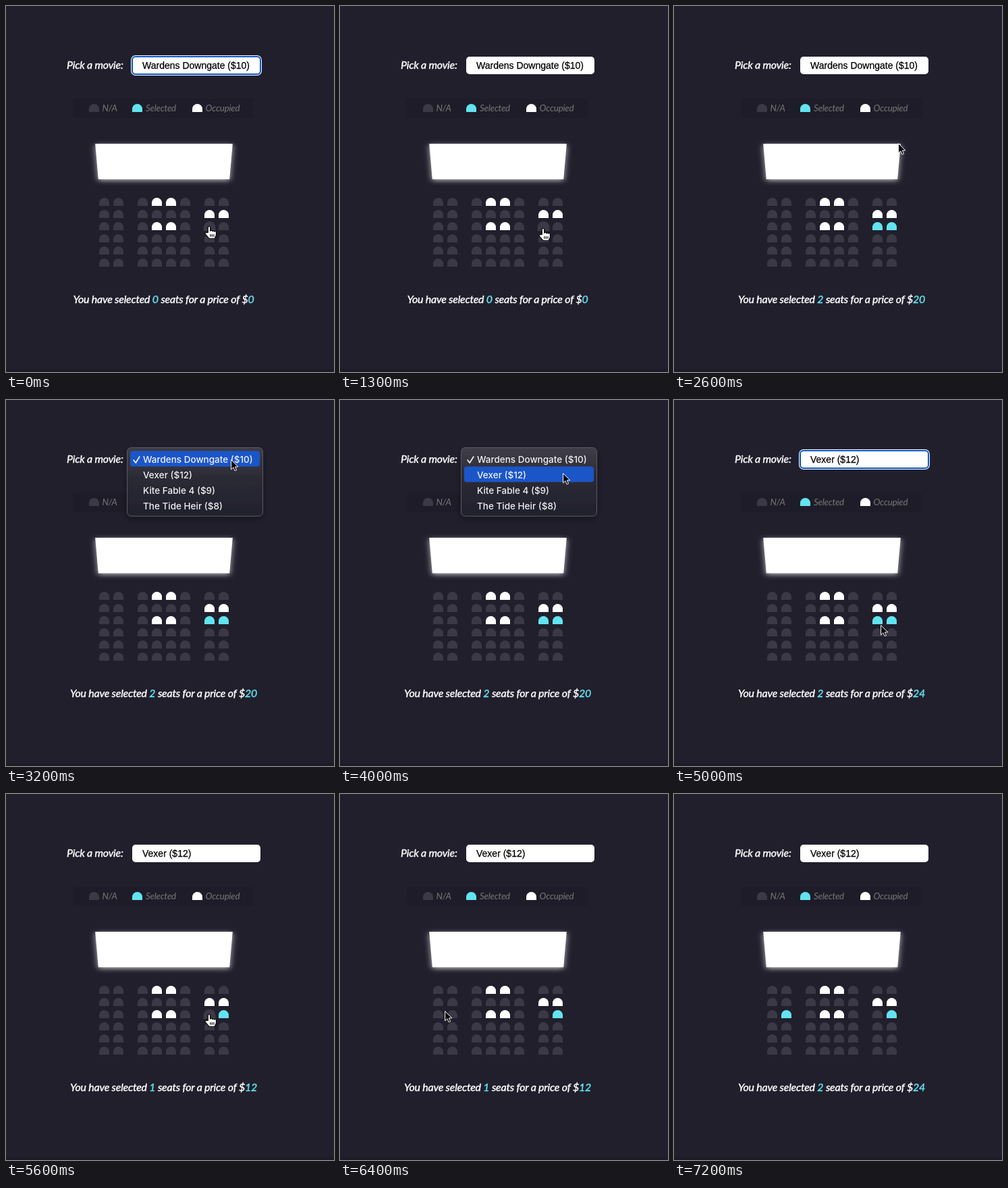
Recreate the animation shown at these times as an HTML page. Size 486 px wide and 542 px high, loop 7300 ms.

```html
<!DOCTYPE html>
<html lang="en">
<head>
<meta charset="utf-8">
<title>Seat booking</title>
<style>
  html, body { margin: 0; width: 100%; height: 100%; overflow: hidden; background: #211f2c; }
  svg { display: block; width: 100vw; height: 100vh; }
  text { fill: currentColor; }
  .lato { font: italic 400 16px Lato, sans-serif; letter-spacing: -.015em; color: #fff; stroke: currentColor; stroke-width: .4; }
  .legend { font: italic 400 13.33px Lato, sans-serif; letter-spacing: -.015em; color: #777; }
  .field { font: 14px "Liberation Sans", Arial, sans-serif; color: #000; stroke: currentColor; stroke-width: .25; }
  .menu { font: 500 13.5px Inter, sans-serif; color: #f1f1f4; }
  .num { color: #62e4f0; fill: currentColor; stroke: currentColor; }
</style>
</head>
<body>
<svg id="stage" viewBox="0 0 486 542">
  <defs>
    <filter id="glow" x="-20%" y="-50%" width="140%" height="200%">
      <feDropShadow dx="0" dy="2" stdDeviation="5 3.6" flood-color="#fff" flood-opacity=".7"/>
    </filter>
    <filter id="shade" x="-20%" y="-20%" width="140%" height="150%">
      <feDropShadow dx="0" dy="4" stdDeviation="5" flood-color="#000" flood-opacity=".35"/>
    </filter>
    <linearGradient id="panel" x2="0" y2="1">
      <stop offset="0" stop-color="#3f3e48"/>
      <stop offset=".45" stop-color="#2b2a35"/>
      <stop offset="1" stop-color="#22212d"/>
    </linearGradient>
    <path id="seat" d="M0 12V7.5a7.5 7.5 0 0 1 15 0V12Z"/>
  </defs>
  <rect width="486" height="542" fill="#211f2c"/>
  <rect y="538" width="486" height="4" fill="#1d1b27"/>

  <text class="lato" x="90" y="93">Pick a movie:</text>
  <g id="ring">
    <rect x="185" y="73" width="194" height="30" rx="7" fill="#fff"/>
    <rect x="186" y="74" width="192" height="28" rx="6" fill="#0a55c8"/>
  </g>
  <rect id="box" y="75" fill="#fff"/>
  <text id="choice" class="field" x="202" y="93"></text>

  <rect x="99" y="137" width="268" height="29" rx="5" fill="#1e1c28"/>
  <g id="legend"></g>

  <path d="M132.2 204H335.8L331.2 256.5H136.8Z" fill="#fff" filter="url(#glow)"/>
  <g id="seats"></g>
  <text class="lato" x="233.5" y="440" text-anchor="middle">You have selected <tspan id="count" class="num"></tspan> seats for a price of $<tspan id="total" class="num"></tspan></text>

  <g id="menu">
    <rect x="179.5" y="70.5" width="201" height="101.5" rx="6" fill="url(#panel)" stroke="#5b5a64" filter="url(#shade)"/>
    <rect id="mark" x="184" width="192" height="23" rx="4" fill="#1b56c8"/>
    <path d="M189 89l3.2 4 5.6-9" fill="none" stroke="#f1f1f4" stroke-width="1.7" stroke-linecap="round" stroke-linejoin="round"/>
  </g>

  <g id="cursor" stroke-linejoin="round">
    <path id="arrow" d="M.6 .6V14.8l3.3-3.1 2.3 5.1 2.4-1-2.2-4.9H10.8Z" fill="#000" stroke="#fff"/>
    <path id="hand" transform="translate(0 -1) scale(1.15 1.05)" d="M-1.5 8V1a1.4 1.4 0 0 1 2.9 0V6a1.4 1.4 0 0 1 2.7.3 1.4 1.4 0 0 1 2.6.5 1.3 1.3 0 0 1 2.4.8V11.5L7.2 16.5H0L-5 10a1.3 1.3 0 0 1 1.9-1.7ZM1.6 10.5v3.5M3.8 10.5v3.5M6 10.5v3.5" fill="#fff" stroke="#000"/>
  </g>
</svg>
<script>
const LOOP = 7300, STEP = 100;
const FREE = "#3b3946", PICKED = "#62e4f0", TAKEN = "#fff";
const MOVIES = [["Wardens Downgate", 10], ["Vexer", 12], ["Kite Fable 4", 9], ["The Tide Heir", 8]];
const COLS = [138, 159, 195, 216, 237, 258, 294, 315];
const OCCUPIED = ["0,3", "0,4", "1,6", "1,7", "2,3", "2,4"];
// seat key: [picked at, released at]
const PICKS = { "2,6": [1400, 5300], "2,7": [2000, LOOP], "2,1": [6600, LOOP] };
const MENU = [3000, 4300];
// pointer path: time, x, y
const PATH = [
  [0, 301, 328], [900, 301, 328], [1300, 301, 331], [1600, 301, 331],
  [1900, 321, 329], [2400, 323, 327], [2600, 332, 203], [2800, 333, 88],
  [3300, 333, 88], [3700, 330, 108], [4400, 330, 108], [5000, 306, 333],
  [5200, 303, 328], [5600, 301, 328], [6200, 155, 321], [6400, 155, 321],
  [6500, 163, 326], [6700, 163, 326], [7100, 319, 511], [7200, 319, 511]
];

const $ = id => document.getElementById(id);
const show = (id, on) => $(id).setAttribute("display", on ? "inline" : "none");
const within = (t, [a, b]) => t >= a && t < b;
const label = ([name, price]) => `${name} ($${price})`;

function add(parent, tag, attrs, text = "") {
  const el = document.createElementNS("http://www.w3.org/2000/svg", tag);
  for (const k in attrs) el.setAttribute(k, attrs[k]);
  el.textContent = text;
  return $(parent).appendChild(el);
}

[["N/A", 123, 142.5, FREE], ["Selected", 187, 207, PICKED], ["Occupied", 276, 295.5, TAKEN]].forEach(([text, x, tx, fill]) => {
  add("legend", "use", { href: "#seat", x, y: 145, fill });
  add("legend", "text", { class: "legend", x: tx, y: 156 }, text);
});

MOVIES.forEach((m, i) => add("menu", "text", { class: "menu", x: 203, y: 93 + 23 * i }, label(m)));

const seats = [];
for (let row = 0; row < 6; row++) COLS.forEach((x, col) => {
  const key = row + "," + col, taken = OCCUPIED.includes(key);
  seats.push({ key, taken, x, y: 284 + 18 * row, el: add("seats", "use", { href: "#seat", fill: taken ? TAKEN : FREE }) });
});

function pointer(t) {
  const i = PATH.findIndex(p => p[0] > t);
  if (i < 0) return null;
  const [t0, x0, y0] = PATH[i - 1], [t1, x1, y1] = PATH[i];
  const u = (t - t0) / (t1 - t0), e = u * u * (3 - 2 * u);
  return [x0 + (x1 - x0) * e, y0 + (y1 - y0) * e];
}

function draw(t) {
  const tip = pointer(t), open = within(t, MENU);
  let picked = 0, over = false;

  for (const s of seats) {
    const on = s.key in PICKS && within(t, PICKS[s.key]);
    const hover = tip && !s.taken && tip[0] >= s.x && tip[0] <= s.x + 15 && tip[1] >= s.y && tip[1] <= s.y + 12;
    if (on) picked++;
    if (hover) over = true;
    if (!s.taken) s.el.setAttribute("fill", on ? PICKED : FREE);
    s.el.setAttribute("transform", `translate(${s.x} ${s.y})` + (hover ? " translate(-1.5 -1.2) scale(1.2)" : ""));
  }

  const movie = MOVIES[t < MENU[1] ? 0 : 1];
  $("choice").textContent = label(movie);
  $("count").textContent = picked;
  $("total").textContent = picked * movie[1];

  const focus = t < 1200 || within(t, [MENU[0], 5200]);
  const box = focus ? [188, 76, 188, 24, 4] : [187, 75, 190, 26, 5];
  ["x", "y", "width", "height", "rx"].forEach((k, i) => $("box").setAttribute(k, box[i]));
  show("ring", focus);

  show("menu", open);
  if (open) $("mark").setAttribute("y", 75.5 + 23 * Math.floor((tip[1] - 76) / 23));

  show("cursor", tip);
  show("hand", over);
  show("arrow", !over);
  if (tip) $("cursor").setAttribute("transform", `translate(${tip[0]} ${tip[1]})`);
}

const start = performance.now();
function tick() {
  const t = (performance.now() - start) % LOOP;
  draw(Math.floor(t / STEP) * STEP);
  requestAnimationFrame(tick);
}
tick();
</script>
</body>
</html>
```
